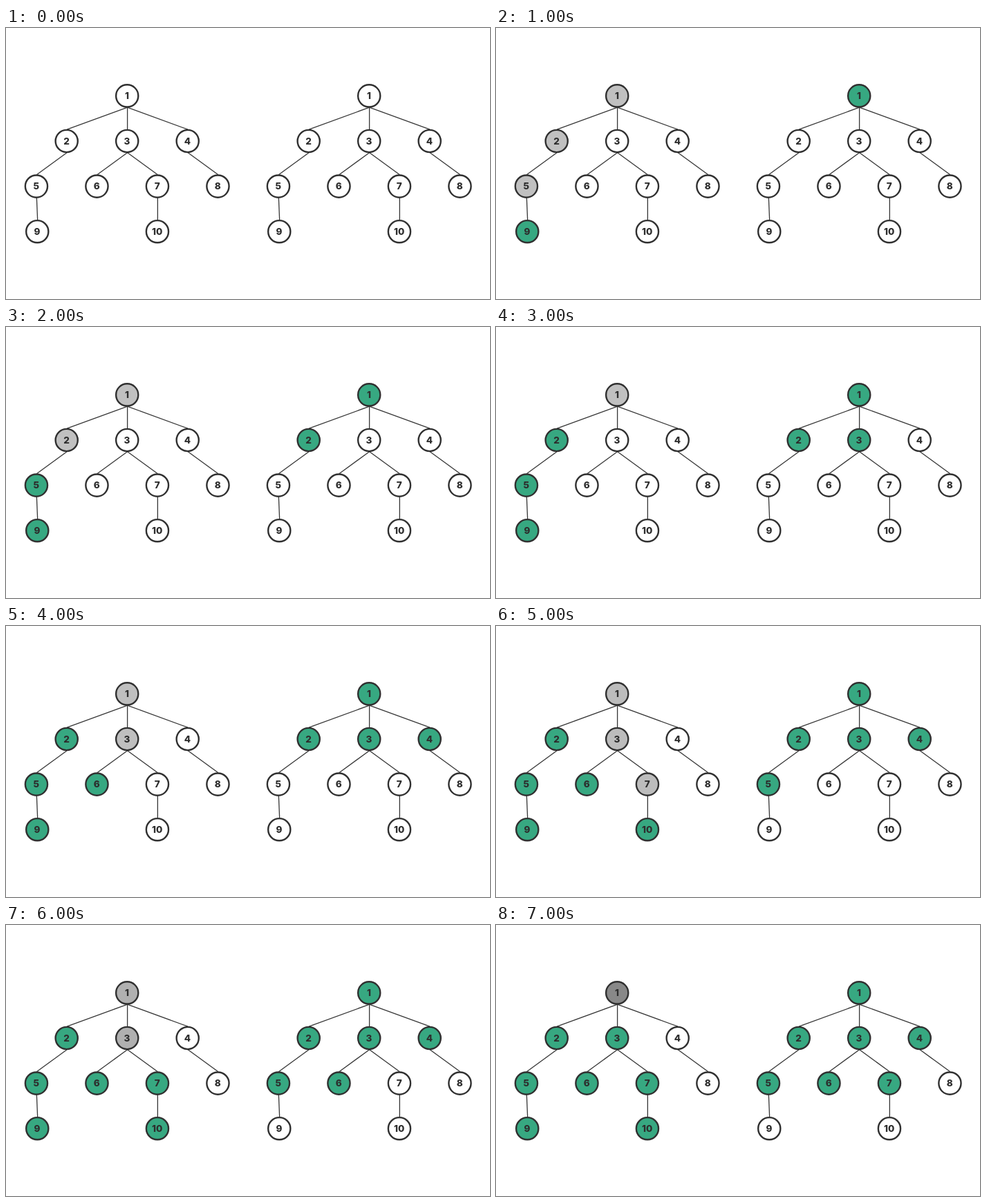
These frames come from a looping animation (700x393 px, 8 s). An HTML page:

```html
<!DOCTYPE html>
<html lang="en">
<head>
<meta charset="utf-8">
<title>Depth-first and breadth-first traversal</title>
<style>
  html, body { margin: 0; width: 100%; height: 100%; overflow: hidden; background: #fff; }
  svg { display: block; width: 100vw; height: 100vh; }
  line { stroke: #363636; stroke-width: 1.3; }
  circle { fill: #fff; stroke: #303030; stroke-width: 2.4; }
  text { font: 800 13.5px Inter, sans-serif; fill: #2d2d2d; text-anchor: middle; }
</style>
</head>
<body>
<svg id="stage" viewBox="0 0 700 393"></svg>
<script>
const STEP = 1000, STEPS = 8;
const WIDTH = 350, TOP = 98.4, ROW = 65.6, RADIUS = 16.1;
const GREEN = '#37a881';

// Parent and side of nodes 2 to 10; the spread halves with each level
const LINKS = [[1, -1], [1, 0], [1, 1], [2, -1], [3, -1], [3, 1], [4, 1], [5, 0.06], [7, 0]];
const root = { id: 1, depth: 0, x: WIDTH / 2, y: TOP, children: [] };
const nodes = [root];
for (const [parentId, side] of LINKS) {
  const parent = nodes[parentId - 1];
  const depth = parent.depth + 1;
  const node = {
    id: nodes.length + 1, parent, depth, children: [],
    x: parent.x + side * WIDTH / 2 ** (depth + 1),
    y: TOP + ROW * depth
  };
  parent.children.push(node);
  nodes.push(node);
}

const postorder = node => [...node.children.flatMap(postorder), node];
const ancestors = node => node && node.parent ? [node.parent, ...ancestors(node.parent)] : [];
const depthOrder = postorder(root);

const stage = document.getElementById('stage');

function add(parent, tag, attrs) {
  const el = document.createElementNS('http://www.w3.org/2000/svg', tag);
  for (const key in attrs) el.setAttribute(key, attrs[key]);
  return parent.appendChild(el);
}

function makeTree(left) {
  const group = add(stage, 'g', { transform: `translate(${left} 0)` });
  for (const { parent, x, y } of nodes.slice(1)) {
    add(group, 'line', {
      x1: parent.x + 0.6, y1: parent.y + 16.7,
      x2: x + 0.6, y2: y - 16.8
    });
  }
  return nodes.map(({ id, x, y }) => {
    const circle = add(group, 'circle', { cx: x + 0.2, cy: y, r: RADIUS });
    add(group, 'text', { x, y: y + 4.8 }).textContent = id;
    return circle;
  });
}

const depthTree = makeTree(0);
const breadthTree = makeTree(WIDTH);

function paint(tree, done, open = [], shade) {
  nodes.forEach((node, i) => {
    tree[i].style.fill = done.includes(node) ? GREEN : open.includes(node) ? shade : '#fff';
  });
}

let shown = -1;

function draw(now) {
  const step = Math.floor(now / STEP) % STEPS;
  if (step !== shown) {
    shown = step;
    // Open nodes darken towards the end
    const gray = Math.round(192 - 56 * (step / (STEPS - 1)) ** 8);
    const done = depthOrder.slice(0, step);
    paint(depthTree, done, ancestors(done[step - 1]), `rgb(${gray}, ${gray}, ${gray})`);
    paint(breadthTree, nodes.slice(0, step));
  }
  requestAnimationFrame(draw);
}

draw(performance.now());
</script>
</body>
</html>
```
